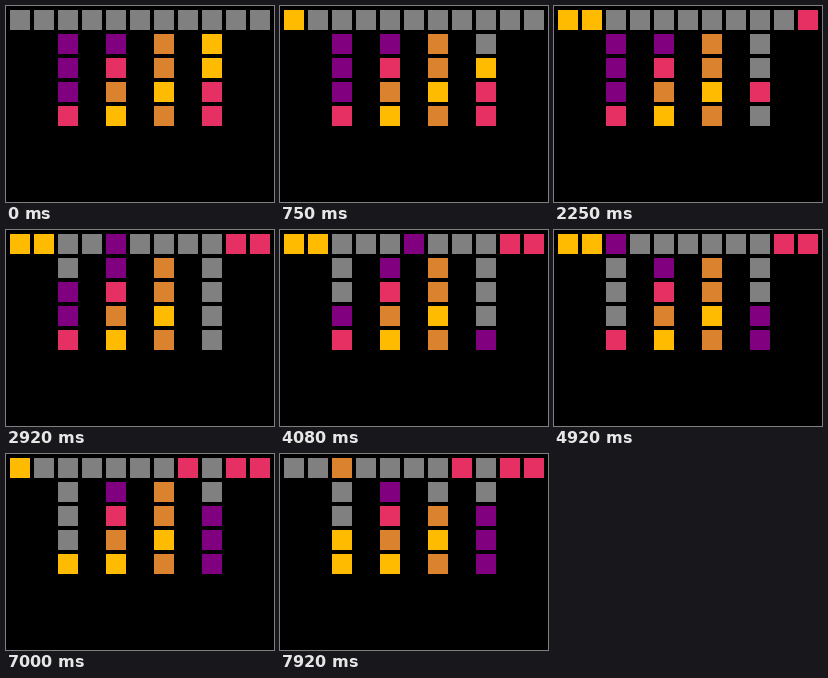
Write an HTML page with a canvas that moves like this. It is 268 by 196 pixels and loops after 8 s.

```html
<!DOCTYPE html>
<html lang="en">
<head>
<meta charset="utf-8">
<title>Sorting burrow</title>
<style>
  html, body { margin: 0; width: 100%; height: 100%; overflow: hidden; background: #000; }
  canvas { display: block; width: 268px; height: 196px; }
</style>
</head>
<body>
<canvas id="stage" width="268" height="196"></canvas>
<script>
const COLORS = { '.': '#808080', A: '#ffbb00', B: '#da822e', C: '#e63064', D: '#800080' };
const PITCH = 24, SIZE = 20, MARGIN = 4, DURATION = 8000, FPS = 12;

// Row 0 is the hallway; the rooms hang below it.
const ROOMS = { 2: 'DDDC', 4: 'DCBA', 6: 'BBAB', 8: 'AACC' };

// Each move: from column, from row, to column, to row.
const MOVES = [
  [8, 1, 0, 0], [8, 2, 1, 0], [8, 3, 10, 0], [8, 4, 9, 0],
  [2, 1, 8, 4], [2, 2, 8, 3], [2, 3, 8, 2], [2, 4, 7, 0],
  [1, 0, 2, 4], [0, 0, 2, 3], [6, 1, 1, 0]
];

const key = (col, row) => col + ',' + row;

function startBoard() {
  const board = {};
  for (let col = 0; col < 11; col++) board[key(col, 0)] = '.';
  for (const col in ROOMS) [...ROOMS[col]].forEach((kind, i) => board[key(col, i + 1)] = kind);
  return board;
}

// Up to the hallway, along it, then down into a room.
function positionAt([fromCol, fromRow, toCol, toRow], step) {
  const across = Math.abs(toCol - fromCol);
  if (step <= fromRow) return [fromCol, fromRow - step];
  step -= fromRow;
  if (step <= across) return [fromCol + Math.sign(toCol - fromCol) * step, 0];
  return [toCol, Math.min(step - across, toRow)];
}

// A move shows its starting position for one tick before it steps.
function boardAt(tick) {
  const board = startBoard();
  for (const move of MOVES) {
    const [fromCol, fromRow, toCol, toRow] = move;
    const length = fromRow + Math.abs(toCol - fromCol) + toRow;
    const from = key(fromCol, fromRow), kind = board[from];
    board[from] = '.';
    board[key(...positionAt(move, Math.min(tick, length)))] = kind;
    tick -= length + 1;
    if (tick < 0) break;
  }
  return board;
}

// Ticks begin on whole hundredths of a second.
const tickStart = tick => Math.round(tick * 100 / FPS) * 10;
function tickAt(time) {
  const tick = Math.floor((time + 5) * FPS / 1000);
  return tickStart(tick) > time ? tick - 1 : tick;
}

const ctx = document.getElementById('stage').getContext('2d');

function draw(time) {
  const board = boardAt(tickAt(time));
  ctx.fillStyle = '#000';
  ctx.fillRect(0, 0, 268, 196);
  for (const cell in board) {
    const [col, row] = cell.split(',').map(Number);
    ctx.fillStyle = COLORS[board[cell]];
    ctx.fillRect(MARGIN + col * PITCH, MARGIN + row * PITCH, SIZE, SIZE);
  }
}

const started = performance.now();
function frame() {
  draw((performance.now() - started) % DURATION);
  requestAnimationFrame(frame);
}
frame();
</script>
</body>
</html>
```
